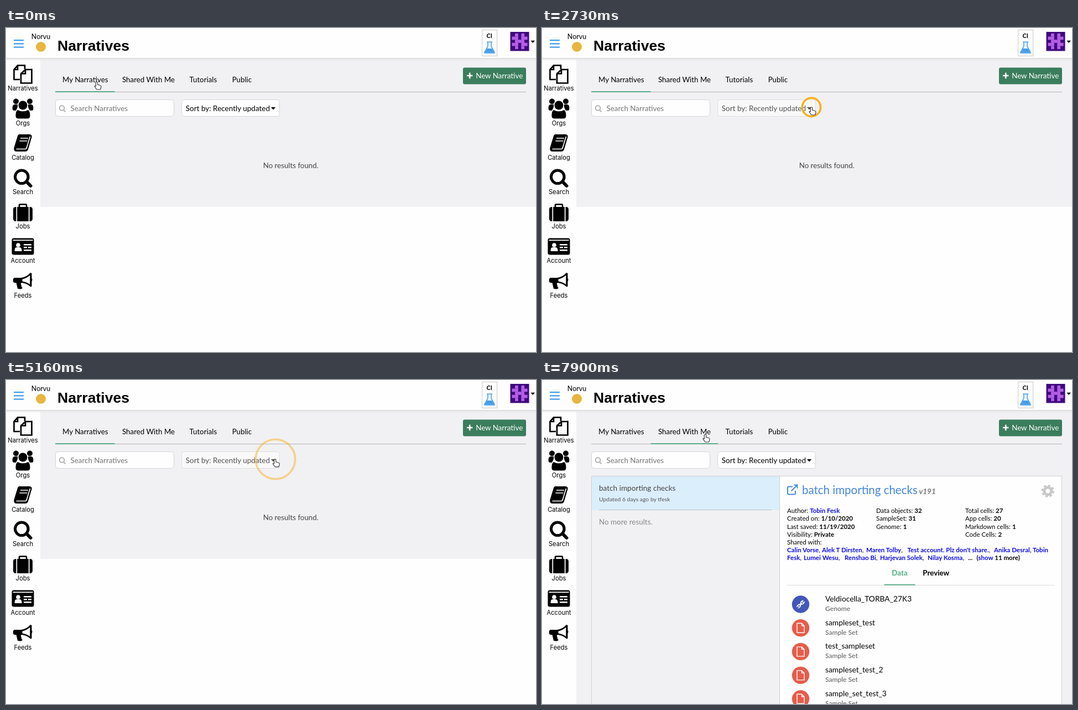
Recreate the animation shown at these times as an HTML page. Size 958 px wide and 585 px high, loop 8 s.

```html
<!DOCTYPE html>
<html lang="en">
<head>
<meta charset="utf-8">
<title>Narratives</title>
<style>
html, body { margin: 0; width: 100%; height: 100%; overflow: hidden; background: #fefefe; }
svg { display: block; font: 13.3px Lato, sans-serif; }
.b, #meta tspan { font-weight: 700; }
.mid { text-anchor: middle; }
.side { font: 11.2px Inter, sans-serif; text-anchor: middle; }
.box { fill: #fefefe; stroke: #d4d4d7; }
.line { fill: none; stroke: #000; stroke-width: 2.7; }
#meta { font-size: 11.5px; }
.link { fill: #0d0de0; }
</style>
</head>
<body>
<svg width="958" height="585" viewBox="0 0 958 585">
  <defs>
    <linearGradient id="shade" x2="0" y2="1">
      <stop stop-color="#d9d9da"/><stop offset="1" stop-color="#d9d9da" stop-opacity="0"/>
    </linearGradient>
    <filter id="glow" x="-20%" y="-20%" width="140%" height="140%">
      <feDropShadow dx="0" dy="0" stdDeviation="4" flood-opacity=".25"/>
    </filter>
  </defs>
  <rect id="panel" x="62" y="57" width="896" height="266" fill="#f1f1f4"/>

  <!-- header -->
  <rect width="958" height="54" fill="#fefefe"/>
  <rect y="54" width="958" height="5" fill="url(#shade)"/>
  <path d="M14 22.2H32M14 28.4H32M14 34.6H32" stroke="#3f9bec" stroke-width="2.2"/>
  <text x="63" y="20" class="mid" font-size="12.5">Norvu</text>
  <circle cx="63" cy="34" r="9" fill="#e9b53f"/>
  <text x="93" y="41.3" style="font:700 26.6px 'Liberation Sans',Arial,sans-serif">Narratives</text>
  <rect x="860.5" y="3.5" width="27" height="47" class="box" style="stroke:#c9c9c9"/>
  <text x="873.8" y="17.5" class="mid b" font-size="11">CI</text>
  <path d="M869 25.2H879M871 25V33L865 44Q864.6 45.3 866 45.3H882Q883.4 45.3 883 44L877 33V25" fill="none" stroke="#459fe9" stroke-width="1.6"/>
  <path d="M869.5 37H878.5L882.5 44.6H865.5z" fill="#459fe9"/>
  <rect x="911.5" y="7" width="34" height="34.5" fill="#40097c"/>
  <g id="avatar" fill="#b45fe8"></g>
  <path d="M948.5 22.8H956L952.2 27z"/>

  <!-- sidebar -->
  <path class="line" d="M34 74V67.5H21L14.5 75V93H25M21 67.5V75H14.5M35 75H46.5V99.5H27V82.5zV82.5H27"/>
  <g>
    <circle cx="18" cy="132.5" r="5"/><circle cx="43" cy="132.5" r="5"/>
    <path d="M12 148Q10.5 139 15 138H21V143L18 149H14zM49 148Q50.5 139 46 138H40V143L43 149H47z"/>
    <circle cx="30.5" cy="139.5" r="8"/>
    <path d="M21 148Q30.5 153 40 148Q43.5 150 43.5 159Q43 163.5 39 163.5H22Q18 163.5 17.5 159Q17.5 150 21 148z"/>
  </g>
  <path d="M24 192H43Q47.5 193 46.5 197L40 219Q39 223 35 223H18Q13.5 222 14.5 216L21 195Q22 192 24 192z"/>
  <path d="M26 199H40M24.5 204H38.5M18.5 218.5H35.5Q37 218 38 214L43.5 196" fill="none" stroke="#fefefe" stroke-width="1.7"/>
  <circle class="line" cx="28.3" cy="268.8" r="11.8" style="stroke-width:5"/>
  <path d="M37 277.5L44.5 285" stroke="#000" stroke-width="6" stroke-linecap="round"/>
  <rect x="13" y="323" width="35" height="26" rx="4.5"/>
  <path class="line" d="M24 323V319.5Q24 318.5 25 318.5H36Q37 318.5 37 319.5V323"/>
  <path d="M19.3 323V349M41.7 323V349" stroke="#fefefe" stroke-width="1.8"/>
  <rect x="10.5" y="379.5" width="40" height="30" rx="3.5"/>
  <g fill="#fefefe">
    <rect x="12.5" y="382.3" width="36" height="1.8"/>
    <circle cx="22" cy="392" r="3.8"/><path d="M15.5 403Q15.5 396 19 396H25Q28.5 396 28.5 403z"/>
    <path d="M32 390H46V392.4H32zM32 395H38V397.4H32zM40 395H46V397.4H40zM32 400H46V402.4H32z"/>
  </g>
  <path d="M16 451H27Q37 450 44 442Q46.5 441.5 46.5 444V452Q48.5 454 46.5 457.5V466Q46 468 44 467Q37 460.5 28 460Q25.5 462 28 464.5Q27 467 30 469.5Q27 473 21 470.5L18.5 460H16Q13 460 13 457V454Q13 451 16 451z"/>
  <path d="M29.5 453.5Q37 452 43.3 446.5V463Q37 458.5 29.5 457.5z" fill="#fefefe"/>
  <g id="labels"></g>

  <!-- tabs and filters -->
  <path d="M89 115.5H940" stroke="#b3b3b8"/>
  <path id="bar" stroke="#46a17a" stroke-width="1.7"/>
  <g id="tabs">
    <text x="102" y="98">My Narratives</text>
    <text x="210" y="98">Shared With Me</text>
    <text x="331.5" y="98">Tutorials</text>
    <text x="408.7" y="98">Public</text>
  </g>
  <rect x="826" y="71.5" width="114" height="30" rx="3" fill="#3b7d5c"/>
  <path d="M833 86H843.4M838.2 80.8V91.2" stroke="#fff" stroke-width="2.6"/>
  <text x="849.2" y="90.7" fill="#fff">New Narrative</text>
  <rect x="89.5" y="129.5" width="214" height="30" rx="4" class="box"/>
  <path d="M104.3 148.3L107.6 151.6M105.4 144.5A4.4 4.4 0 1 1 96.6 144.5A4.4 4.4 0 1 1 105.4 144.5" fill="none" stroke="#aaa" stroke-width="1.7"/>
  <text x="116.5" y="149.7" font-size="13.4" fill="#777">Search Narratives</text>
  <g id="sort">
    <rect x="317.5" y="129.5" width="177" height="30" rx="4" class="box"/>
    <text x="324.8" y="149.7" font-size="13.5">Sort by: Recently updated</text>
    <path d="M478.8 143H487.4L483.1 147.6z"/>
  </g>
  <text id="none" x="464.7" y="253" fill="#444">No results found.</text>

  <!-- shared list -->
  <g id="shared">
    <rect x="429.5" y="173.5" width="510" height="420" fill="#fefefe" stroke="#cfcfd2"/>
    <path d="M89.5 585V173.5H430" fill="none" stroke="#cfcfd2"/>
    <rect x="90" y="174" width="339" height="61" fill="#dbeefc"/>
    <path d="M103 234.5H415" stroke="#b4c0c8"/>
    <text x="103" y="200" font-size="13.6" fill="#444">batch importing checks</text>
    <text x="103" y="219" font-size="10.4" fill="#555">Updated 6 days ago by tfesk</text>
    <text x="103" y="260.5" font-size="13.4" fill="#888">No more results.</text>

    <g fill="none" stroke="#4285dc" stroke-width="1.9">
      <path d="M453 192.5H446Q444 192.5 444 194.5V204.5Q444 206.5 446 206.5H456Q458 206.5 458 204.5V200M450.5 200.5L461 190M455.5 189.8H461.5V195.8"/>
    </g>
    <text x="470" y="206" font-size="20.5" fill="#4285dc">batch importing checks</text>
    <text x="681.5" y="206" class="b" font-size="13.6" font-style="italic" fill="#777">v191</text>
    <g fill="none" stroke="#c9c9c9">
      <circle cx="914.3" cy="200.5" r="6.4" stroke-width="5"/>
      <circle cx="914.3" cy="200.5" r="9.8" stroke-width="3.6" stroke-dasharray="4.2 3.497"/>
    </g>
    <g id="meta">
      <text x="443" y="240">Author: <tspan class="link">Tobin Fesk</tspan></text>
      <text x="443" y="254.2">Created on: <tspan>1/10/2020</tspan></text>
      <text x="443" y="268.5">Last saved: <tspan>11/19/2020</tspan></text>
      <text x="443" y="282.8">Visibility: <tspan>Private</tspan></text>
      <text x="443" y="297">Shared with:</text>
      <text x="604" y="240">Data objects: <tspan>32</tspan></text>
      <text x="604" y="254.2">SampleSet: <tspan>31</tspan></text>
      <text x="604" y="268.5">Genome: <tspan>1</tspan></text>
      <text x="765" y="240">Total cells: <tspan>27</tspan></text>
      <text x="765" y="254.2">App cells: <tspan>20</tspan></text>
      <text x="765" y="268.5">Markdown cells: <tspan>1</tspan></text>
      <text x="765" y="282.8">Code Cells: <tspan>2</tspan></text>
      <text x="770" y="325" class="b">...</text>
      <text x="785.5" y="325" class="b">(<tspan class="link">show</tspan> 11 more)</text>
    </g>
    <text x="646.5" y="353" class="mid b" fill="#52aa84">Data</text>
    <text x="712.3" y="353" class="mid b">Preview</text>
    <path d="M443 370.5H926" stroke="#dcdcdc"/>
    <path d="M618.5 369.6H674.5" stroke="#52aa84" stroke-width="1.7"/>
    <g id="rows"></g>
  </g>

  <g id="menu"></g>
  <circle id="ring" fill="none" stroke="#f9af1d" stroke-width="3.6"/>
  <path id="hand" d="M-1.6 1Q0 -1 1.6 1V5.2L5.5 6.2Q8 7 8 8.5Q8 11.5 6.4 14H0L-4 8.6Q-3.6 6.6 -1.6 8z" fill="#fff" stroke="#333" stroke-width="1.1"/>
  <path id="arrow" d="M0 0V11.5L2.6 9.2L4.6 13.8L6.6 12.9L4.7 8.4H8.2z" fill="#111" stroke="#fff" stroke-width=".8"/>
</svg>
<script>
const $ = id => document.getElementById(id);
const show = (id, on) => $(id).style.display = on ? '' : 'none';

$('labels').innerHTML = ['Narratives', 'Orgs', 'Catalog', 'Search', 'Jobs', 'Account', 'Feeds']
  .map((s, i) => `<text class="side" x="30.5" y="${113.3 + 62.2 * i}">${s}</text>`).join('');

$('avatar').innerHTML = ['01010', '11011', '01110', '11011', '01010']
  .map((row, j) => [...row].map((c, i) => +c
    ? `<rect x="${914.5 + 5.6 * i}" y="${10 + 5.6 * j}" width="5.7" height="5.7"/>` : '').join('')).join('');

// people the item is shared with: [x, name] per line
const people = [
  [[443, 'Calin Vorse'], [506, 'Alek T Dirsten'], [586, 'Maren Tolby'],
   [660.5, "Test account. Plz don't share."], [817, 'Anika Desral'], [887, 'Tobin', '']],
  [[443, 'Fesk'], [473, 'Lumei Wesu'], [547, 'Renshao Bi'], [611, 'Harjevan Solek'], [697, 'Nilay Kosma']]
];
$('meta').innerHTML += people.map((line, i) => line.map(([x, name, end = ',']) =>
  `<text x="${x}" y="${311 + 14 * i}"><tspan class="link">${name}</tspan>${end}</text>`).join('')).join('');

const dna = '<path d="M-7 5Q-5 -1 0 0T7 -5M-5 7Q1 5 0 0T5 -7M-5.5 2L-2 5.5M2 -5.5L5.5 -2M-3 0L0 3M0 -3L3 0"/>';
const page = '<path d="M-6.5 -8.5H2L6.5 -4V8.5H-6.5zM2 -8.5V-4H6.5"/>';
$('rows').innerHTML = ['Veldiocella_TORBA_27K3', 'sampleset_test', 'test_sampleset', 'sampleset_test_2', 'sample_set_test_3']
  .map((name, i) => `<g transform="translate(0 ${42.7 * i})">
    <circle cx="467.5" cy="405" r="15.7" fill="${i ? '#e65c4a' : '#4257b9'}"/>
    <g transform="translate(467.5 405)" fill="none" stroke="#fff" stroke-width="1.4">${i ? page : dna}</g>
    <text x="512" y="400" font-size="13.8">${name}</text>
    <text x="512" y="417" font-size="12.1" fill="#555">${i ? 'Sample Set' : 'Genome'}</text></g>`).join('');

$('menu').innerHTML = '<rect x="318" y="162" width="177" height="156" rx="4" fill="#fefefe" filter="url(#glow)"/>' +
  ['Recently updated', 'Recently created', 'Least recently updated', 'Oldest']
    .map((s, i) => `<text x="326" y="${186 + 39 * i}">${s}</text>`).join('');

const LOOP = 8000, CLICKS = [2530, 4300, 6860], RING = 1035, DELAY = 230;
const [opened, closed, loaded] = CLICKS.map(c => c + DELAY);
const edges = [89, 196.5, 318, 396, 458];
const tabs = [...$('tabs').children];

const ease = u => (1 - Math.cos(Math.PI * Math.min(1, Math.max(0, u)))) / 2;

function pointer(t) {
  if (t < 2300) {
    const p = ease((t - 230) / 2030);
    return [164 + 323 * p, 97 + 46 * (.4 * p + .6 * p ** 8)];
  }
  const p = ease((t - 5130) / 830);
  return [487 - 192 * p, 143 - 45 * p];
}

// tab index, 4 for the sort box, -1 for nothing
function hovered(t) {
  const [x, y] = pointer(t);
  if (y < 115) return edges.findIndex((e, i) => x >= e && x < edges[i + 1]);
  return y > 129 && x > 317 && x < 495 ? 4 : -1;
}

// share of the last 150 ms spent over an item
const dim = (t, item) => [0, 1, 2, 3, 4, 5].filter(k => hovered(t - 25 * k) === item).length / 6;

function draw(t) {
  const done = t >= loaded, active = done ? 1 : 0;
  const [x, y] = pointer(t), over = hovered(t) >= 0;

  tabs.forEach((tab, i) => tab.style.opacity = i === active ? 1 : 1 - .5 * dim(t, i));
  $('sort').style.opacity = 1 - .35 * dim(t, 4);
  $('bar').setAttribute('d', `M${edges[active]} 115.2H${edges[active + 1]}`);
  $('panel').setAttribute('height', done ? 528 : 266);
  show('shared', done);
  show('none', !done);
  show('menu', t >= opened && t < closed);

  const click = CLICKS.find(c => t >= c && t < c + RING);
  show('ring', click !== undefined);
  if (click !== undefined) {
    const age = t - click, [cx, cy] = pointer(click), ring = $('ring');
    ring.setAttribute('cx', cx);
    ring.setAttribute('cy', cy);
    ring.setAttribute('r', 8.2 + .0453 * age - .0000155 * age * age);
    ring.style.opacity = Math.min(1, (RING - age) / 350);
  }

  show('hand', over);
  show('arrow', !over);
  $(over ? 'hand' : 'arrow').setAttribute('transform', `translate(${x} ${y})`);
}

const start = performance.now();
function tick() {
  draw((performance.now() - start) % LOOP);
  requestAnimationFrame(tick);
}
tick();
</script>
</body>
</html>
```
